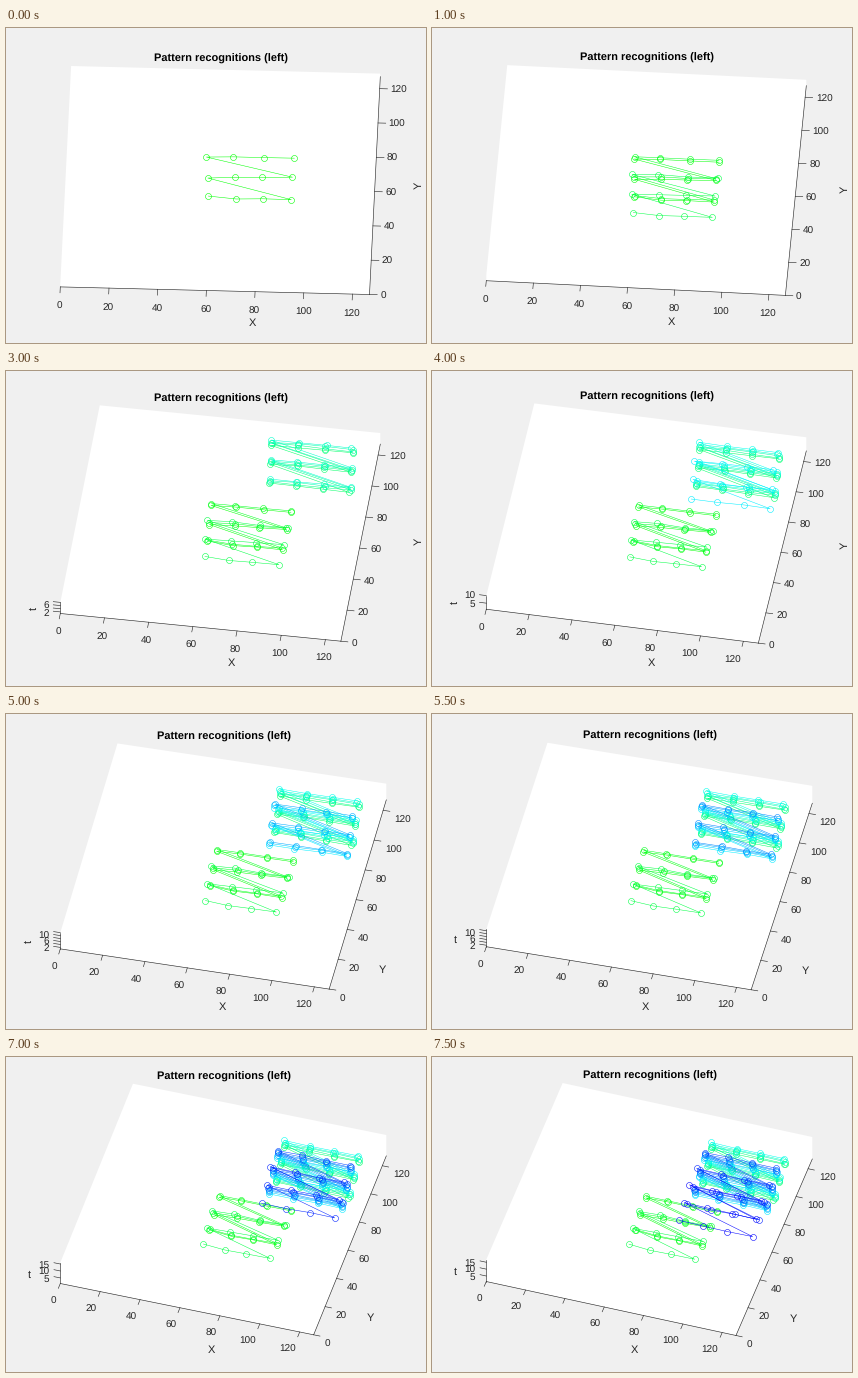
A matplotlib script that plays this animation: 420x315 px, repeating every 8000 ms.

```python
import numpy as np
import matplotlib.pyplot as plt
from matplotlib.animation import FuncAnimation
from colorsys import hsv_to_rgb

W, H, DPI = 420, 315, 100
PX = 72 / DPI
FRAMES, LIMIT = 16, 127
INK = (0.15, 0.15, 0.15)

plt.rcParams["font.family"] = "Liberation Sans"
plt.rcParams["text.hinting"] = "none"
fig = plt.figure(figsize=(W / DPI, H / DPI), dpi=DPI, facecolor="#f0f0f0")
ax = fig.add_axes([0, 0, 1, 1])

# 3 x 4 grids, walked row by row from the bottom left.
FIRST = np.array([
    (58.9, 55.0), (70.4, 53.7), (81.2, 54.2), (93.0, 54.1),
    (58.3, 65.5), (69.6, 66.3), (80.7, 66.6), (93.0, 67.2),
    (57.3, 77.7), (68.4, 78.2), (81.1, 78.2), (93.4, 78.3)])
row, col = np.divmod(np.arange(12), 4)
SECOND = np.column_stack([81.8 + 12.2 * col - 1.3 * row, 92 + 12.4 * row])


def grid(t):
    """Grid position on the floor at step t, stepping down row by row."""
    if t <= 3:
        return FIRST - (0, 11.8 * (t == 3))
    drops = (t >= 9) + (t >= 15) + (t >= 16)
    return SECOND - (0, 12.7 * drops)


rng = np.random.default_rng(4)
patterns = [grid(t) + rng.normal(0, 0.25 * (t > 1), FIRST.shape)
            for t in range(1, FRAMES + 1)]


class View:
    """Orthographic box, stretched to fill the plot area."""

    def __init__(self, k):
        self.n = n = k + 2
        az, el = np.radians(n), np.radians(90 - 0.4 * n)
        wide = k >= 9
        self.top = 30.1 - 0.68 * (k - 9) if wide else 38 - 0.35 * k - 0.044 * k * k
        self.bottom = 304.5 - self.top
        width = 326 if wide else 320
        sx = width / (np.cos(az) + np.sin(az))
        sy = (self.bottom - self.top) / (
            np.sin(el) * (np.cos(az) + np.sin(az)) + np.cos(el))
        self.vx = np.array([sx * np.cos(az), sy * np.sin(el) * np.sin(az)])
        self.vy = np.array([sx * np.sin(az), -sy * np.sin(el) * np.cos(az)])
        self.vz = np.array([0, -sy * np.cos(el)])
        self.origin = np.array([54.3, self.bottom - self.vx[1]])

    def at(self, x, y, t=1):
        x, y = np.asarray(x)[..., None], np.asarray(y)[..., None]
        return (self.origin + x / LIMIT * self.vx + y / LIMIT * self.vy
                + (t - 1) / (self.n - 1) * self.vz)


def line(p, q):
    ax.plot([p[0], q[0]], [p[1], q[1]], color=INK, lw=0.6 * PX)


def label(x, y, s, size=10, ha="center", **kw):
    """Text whose capitals are centred on y."""
    ax.text(x, y + 0.36 * size, s, fontsize=size * PX, ha=ha, va="baseline",
            **{"color": INK, **kw})


def sideways(x, y, s):
    ax.text(x, y, s, fontsize=11 * PX, color=INK, rotation=90,
            ha="center", va="center")


def draw_box(v):
    o, far = v.origin, v.origin + v.vx
    walls = [o, far, far + v.vy, far + v.vy + v.vz, o + v.vy + v.vz, o + v.vz]
    ax.fill(*np.array(walls).T, color="white", lw=0)
    line(o, far)
    line(far, far + v.vy)


def draw_xy_ticks(v, k):
    for s in range(0, LIMIT, 20):
        p = v.at(s, 0)
        line(p, p - 0.027 * v.vy)
        label(p[0] - 0.05 * v.vy[0], p[1] + 18.9 - 0.15 * k, str(s),
              ha="right" if k >= 8 else "center")
        p = v.at(LIMIT, s)
        line(p, p + 0.025 * v.vx)
        label(p[0] + 10.7, p[1] + (9 if k >= 9 else 0.5 + 0.2 * k), str(s),
              ha="left")


def draw_z_axis(v, k):
    n = v.n
    line(v.origin, v.origin + v.vz)
    step = 5 if n == 10 or n >= 15 else 2
    for t in range(step, n + 1, step):
        p = v.at(0, 0, t)
        line(p, p - 0.025 * v.vx)
        if step == 5 or t % 4 == 2:
            label(43.5, p[1], str(t), ha="right")
    x, y = (28 if n < 10 else 23), v.origin[1] + v.vz[1] / 2 + 0.5
    if k < 11:
        sideways(x, y, "t")
    else:
        label(x, y, "t", 11)


def draw_names(v, k):
    label(215 if k < 9 else 217.5, v.top - 8, "Pattern recognitions (left)", 11,
          weight="bold", color="black")
    keys = [0, 4, 6, 8, 10, 12, 15]
    label(np.interp(k, keys, [246, 232, 225, 219, 216, 211, 202]),
          np.interp(k, keys, [294, 291.5, 291, 291, 292.5, 292, 292]), "X", 11)
    if k < 9:
        sideways(413, 157 + 2.2 * k, "Y")
    else:
        label(376 - 3 * (k - 10), 255 + 1.2 * (k - 10), "Y", 11)


def draw(k):
    ax.clear()
    ax.set(xlim=(0, W), ylim=(H, 0))
    ax.axis("off")
    v = View(k)
    draw_box(v)
    draw_xy_ticks(v, k)
    if k >= 4:
        draw_z_axis(v, k)
    draw_names(v, k)
    for t, pts in enumerate(patterns[:k + 1], 1):
        x, y = v.at(pts[:, 0], pts[:, 1], t).T
        ax.plot(x, y, "-o", color=hsv_to_rgb((112 + 8 * t) / 360, 1, 1),
                lw=0.5 * PX, ms=6 * PX, mfc="none", mew=0.55 * PX)
    return []


anim = FuncAnimation(fig, draw, frames=FRAMES, init_func=lambda: [],
                     interval=500, repeat=True, repeat_delay=0)
plt.show()
```
